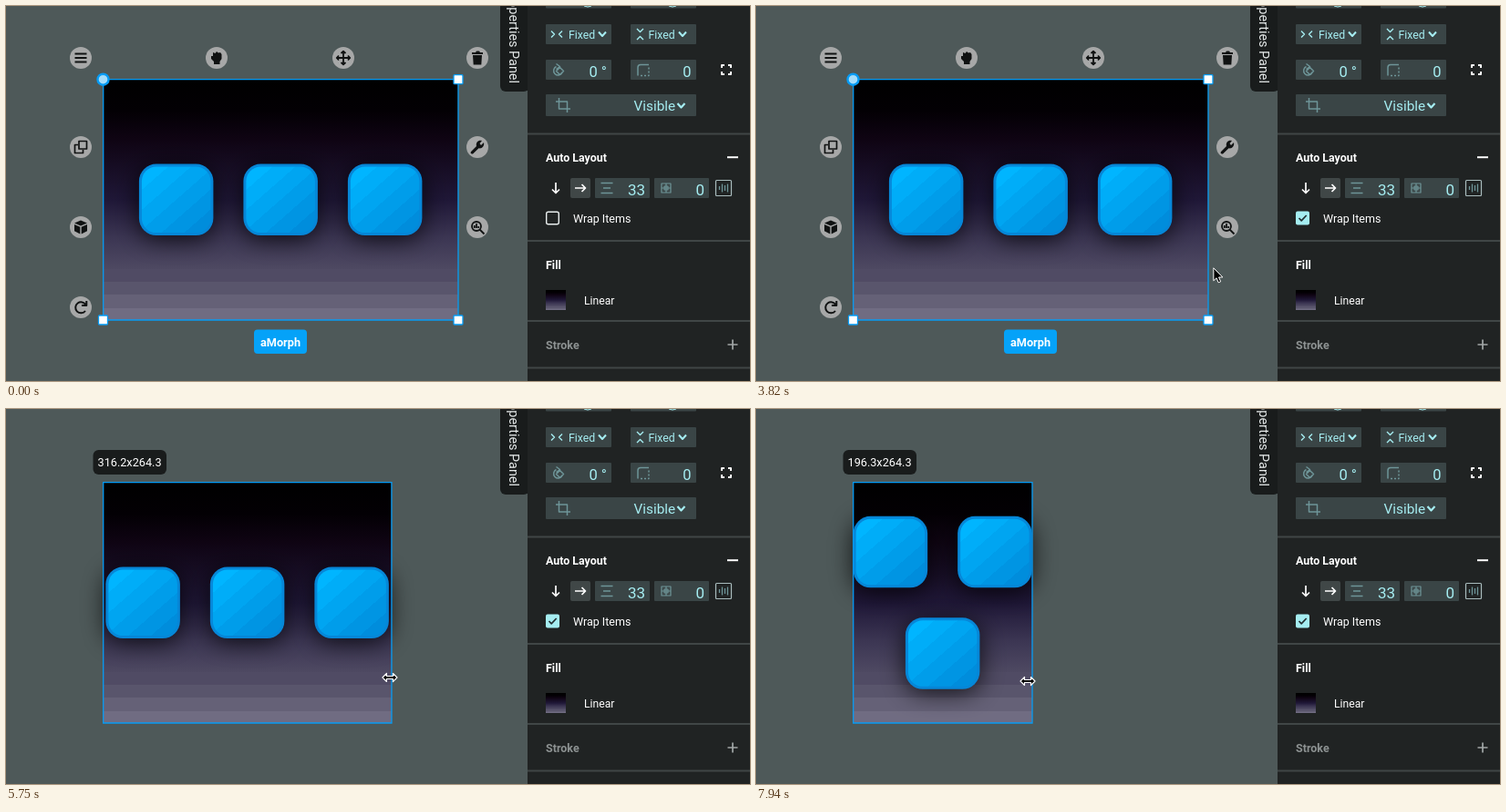
An HTML page with a canvas that plays this animation: 816x412 px, repeating every 8 s.

```html
<!DOCTYPE html>
<html lang="en">
<head>
<meta charset="utf-8">
<title>Wrap items</title>
<style>
html, body { margin: 0; width: 100%; height: 100%; overflow: hidden; background: #4e5959; }
canvas { display: block; }
</style>
</head>
<body>
<canvas id="stage" width="816" height="412"></canvas>
<script>
const ctx = document.getElementById('stage').getContext('2d');
const LOOP = 8000, DRAG_START = 4470, CHECK_AT = 2770;
const BLUE = '#079cf5', CYAN = '#a5edf1', DIM = '#6e9598', FIELD = '#3a4546', WHITE = '#fff';
const FRAME = { x: 106.5, y: 80.7, h: 264.3 };
const ITEM = { w: 81.5, h: 78.5, gap: 33 };

// Keyframes: [time, value, ...]
const WIDTH = [[4470, 389.3], [4700, 385.3], [5750, 316.3], [6500, 272.8], [7070, 230.4], [7940, 196.3]];
const APPROACH = [[660, 630, 384], [900, 612, 325], [1140, 587, 262], [1400, 597, 231]];
const LEAVE = [[3250, 596, 233], [3500, 565, 255], [3750, 510, 283], [3940, 495, 291]];
const RESIZE = [[3940, 495, 291], [4470, 495, 289], [4700, 488, 286], [5750, 421, 295], [6500, 374, 299], [7070, 335, 300], [7940, 298, 299]];

// Smooth interpolation, at rest at both ends
function track(keys, t) {
  const last = keys.length - 1;
  if (t <= keys[0][0]) return keys[0].slice(1);
  if (t >= keys[last][0]) return keys[last].slice(1);
  const i = keys.findIndex(k => k[0] > t) - 1;
  const a = keys[i], b = keys[i + 1], span = b[0] - a[0], u = (t - a[0]) / span;
  const slope = (n, c) => n === 0 || n === last ? 0
    : (keys[n + 1][c] - keys[n - 1][c]) / (keys[n + 1][0] - keys[n - 1][0]);
  return a.slice(1).map((v, j) => {
    const c = j + 1, u2 = u * u, u3 = u2 * u;
    return v * (2 * u3 - 3 * u2 + 1) + b[c] * (3 * u2 - 2 * u3)
      + span * (slope(i, c) * (u3 - 2 * u2 + u) + slope(i + 1, c) * (u3 - u2));
  });
}

function box(x, y, w, h, r, fill, stroke, line = 1) {
  ctx.beginPath();
  ctx.roundRect(x, y, w, h, r);
  if (fill) { ctx.fillStyle = fill; ctx.fill(); }
  if (stroke) { ctx.strokeStyle = stroke; ctx.lineWidth = line; ctx.stroke(); }
}

function text(s, x, y, size, color, weight = 400, align = 'left') {
  ctx.font = `${weight} ${size}px Roboto, "Noto Sans", sans-serif`;
  ctx.fillStyle = color;
  ctx.textAlign = align;
  ctx.fillText(s, x, y);
}

// SVG path drawn around (x, y)
function icon(d, x, y, { stroke, fill, line = 1.5 }) {
  const path = new Path2D(d);
  ctx.save();
  ctx.translate(x, y);
  ctx.lineWidth = line;
  ctx.lineJoin = 'round';
  if (fill) { ctx.fillStyle = fill; ctx.fill(path); }
  if (stroke) { ctx.strokeStyle = stroke; ctx.stroke(path); }
  ctx.restore();
}

const CHEVRON = 'M-4 -2L0 2.5L4 -2';
const ARROW_DOWN = 'M0 -6V5M-4 1.5L0 5.5L4 1.5';
const ARROW_RIGHT = 'M-6 0H5M1.5 -4L5.5 0L1.5 4';

const BACKDROP = [
  [0, 0, 0, 0], [.13, 3, 0, 4], [.25, 15, 4, 19], [.5, 31, 23, 55], [.66, 60, 54, 83], [.79, 78, 73, 98],
  [.79, 80, 75, 100], [.84, 80, 75, 100], [.84, 89, 85, 108], [.895, 89, 85, 108],
  [.895, 101, 97, 119], [.952, 101, 97, 119], [.952, 112, 108, 130], [1, 112, 108, 130]
];

function backdrop(y, h) {
  const g = ctx.createLinearGradient(0, y, 0, y + h);
  for (const [at, r, gr, b] of BACKDROP) g.addColorStop(at, `rgb(${r},${gr},${b})`);
  return g;
}

function item(x, y) {
  const { w, h } = ITEM;
  ctx.save();
  ctx.shadowColor = 'rgba(0,0,0,.78)';
  ctx.shadowBlur = 27;
  ctx.shadowOffsetY = 4;
  box(x, y, w, h, 19, '#0687d8');
  ctx.restore();
  const g = ctx.createLinearGradient(x + 8, y + 2, x + w - 8, y + h - 2), bands = 6;
  for (let i = 0; i < bands; i++) {
    const color = `rgb(0,${181 - i * 8},${255 - i * 7})`;
    g.addColorStop(i / bands, color);
    g.addColorStop((i + 1) / bands, color);
  }
  box(x + 3, y + 3, w - 6, h - 6, 16, g);
}

function frame(width) {
  const { x, y, h } = FRAME, perRow = width >= 3 * ITEM.w + 2 * ITEM.gap ? 3 : 2;
  box(x, y, width, h, 0, backdrop(y, h));
  const rows = Math.ceil(3 / perRow);
  const top = y + (h - rows * ITEM.h - (rows - 1) * ITEM.gap) / 2;
  for (let i = 0; i < 3; i++) {
    const row = Math.floor(i / perRow), count = Math.min(perRow, 3 - row * perRow);
    const left = x + (width - count * ITEM.w - (count - 1) * ITEM.gap) / 2;
    item(left + (i % perRow) * (ITEM.w + ITEM.gap), top + row * (ITEM.h + ITEM.gap));
  }
  box(x + .2, y, width, h, 0, null, BLUE, 1.3);
}

function halo(x, y, d, style) {
  box(x - 12, y - 12, 24, 24, 12, '#a7a8a8');
  icon(d, x, y, style);
}

function halos() {
  const ink = '#101212', solid = { fill: ink }, lines = { stroke: ink, line: 2 };
  halo(82, 57, 'M-6.5 -4.5H6.5M-6.5 0H6.5M-6.5 4.5H6.5', lines);
  halo(231, 57, 'M-4 -6L-1.5 -5L0 -7L2 -5.5L4 -6L5.5 -4V1L3.5 4V7H-3V4L-6 1V-2L-4 -2Z', solid);
  halo(370, 57, 'M-7 0H7M0 -7V7M-2.5 -5L0 -7.3L2.5 -5M-2.5 5L0 7.3L2.5 5M-5 -2.5L-7.3 0L-5 2.5M5 -2.5L7.3 0L5 2.5', { stroke: ink, line: 1.8 });
  halo(517, 57, 'M-6 -6H-2L-1 -7.5H2L3 -6H6V-4H-6ZM-5 -3H5L4.3 7.5H-4.3Z', solid);
  halo(82, 155, 'M-2 -6.5H6.5V2H-2ZM-3 -2.5H-6.5V6.5H2.5V3', { stroke: ink, line: 1.7 });
  halo(517, 155, 'M-7 5L-1 -1C-2 -5 1 -8 5 -7L2.5 -4L4 -2L7 -5C8 -1 5 2 1.5 1.3L-5 7.5C-7 8 -8 6.5 -7 5Z', solid);
  halo(82, 243, 'M0 -7.5L7 -4.5L0 -1.5L-7 -4.5ZM-7 -3L-.7 -.2V7.5L-7 4.3ZM7 -3L.7 -.2V7.5L7 4.3Z', solid);
  halo(517, 243, 'M4 -1A5 5 0 1 1 -6 -1A5 5 0 1 1 4 -1M3 3L7.5 7.5M-3.2 -2V1M-1 -4V1M1.2 -1V1', { stroke: ink, line: 1.8 });
  halo(82, 331, 'M5.5 -2.5A6 6 0 1 0 5 4M6.3 -7V-2H1', lines);

  const right = 496, bottom = FRAME.y + FRAME.h;
  for (const [x, y] of [[right, FRAME.y], [FRAME.x, bottom], [right, bottom]])
    box(x - 5, y - 5, 10, 10, 1, WHITE, BLUE, 1.3);
  box(FRAME.x - 6, FRAME.y - 6, 12, 12, 6, '#a5ddfb', BLUE, 2.4);
  box(272, 355.5, 58, 26.5, 4, '#05a2f8');
  text('aMorph', 301, 374, 12.7, WHITE, 700, 'center');
}

function panel(checked) {
  box(542, -10, 32, 104, 6, '#191c1c');
  ctx.save();
  ctx.translate(551.5, 85);
  ctx.rotate(Math.PI / 2);
  text('Properties Panel', 0, 0, 14.4, '#e4e8e8', 400, 'right');
  ctx.restore();

  box(572, 0, 244, 412, 0, '#202323');
  for (const y of [139.5, 257, 345, 396.5]) box(572, y, 244, 2, 0, '#404646');

  for (const x of [592, 685]) {
    box(x, -10, 72, 12.5, 1, FIELD);
    box(x, 20, 72, 22, 1, FIELD);
    box(x, 59, 72, 22, 1, FIELD);
    icon('M-4 0Q0 2 4 0', x + 46, 0, { stroke: CYAN, line: 1 });
  }
  const cyan = { stroke: CYAN, line: 2 }, dim = { stroke: DIM };
  icon('M-6 -3.5L-2.5 0L-6 3.5M6 -3.5L2.5 0L6 3.5', 604, 31, { stroke: CYAN, line: 1.4 });
  icon('M-3.5 -6L0 -2.5L3.5 -6M-3.5 6L0 2.5L3.5 6', 695.5, 31, { stroke: CYAN, line: 1.4 });
  text('Fixed', 617, 35.5, 12.3, CYAN);
  text('Fixed', 704.5, 35.5, 12.3, CYAN);
  icon(CHEVRON, 654, 30.5, cyan);
  icon(CHEVRON, 742, 30.5, cyan);

  icon('M-2 -4A5 5 0 1 0 4.5 3M-2 -7L2 -4L-2 -1M2 -3L6 1L2 5L-2 1Z', 605.5, 70.5, dim);
  text('0 °', 659, 78, 16.5, CYAN, 400, 'right');
  icon('M-6 6V-3Q-6 -6 -3 -6H6M-3 6H-1M1 6H3M6 -3V-1M6 1V3M5 6H6V5', 699, 70.5, dim);
  text('0', 751.5, 78, 16.5, CYAN, 400, 'right');
  icon('M-5 -2V-5H-2M2 -5H5V-2M5 2V5H2M-2 5H-5V2', 790, 70, { stroke: WHITE, line: 2 });

  box(592, 97, 165, 24, 1, FIELD);
  icon('M-8 -4H4.5V8M-4.5 -8V4H8', 611, 109, dim);
  text('Visible', 688.5, 115, 15.4, CYAN);
  icon(CHEVRON, 740.5, 109, { stroke: CYAN, line: 2.2 });

  text('Auto Layout', 592, 171, 12.4, WHITE, 700);
  box(791, 165.2, 12, 2, 0, WHITE);
  icon(ARROW_DOWN, 603, 200, { stroke: WHITE, line: 1.7 });
  box(619, 189, 22, 22, 2, '#404747');
  icon(ARROW_RIGHT, 630, 200, { stroke: WHITE, line: 1.7 });
  box(646, 189, 60, 22, 1, FIELD);
  icon('M-6.5 -5.5H6.5M-4 0H4M-6.5 5.5H6.5', 659, 200, dim);
  text('33', 701, 208, 17, CYAN, 400, 'right');
  box(711, 189, 60, 22, 1, FIELD);
  icon('M-5 -5H5V5H-5ZM-5 0H5M0 -5V5M-2 -2H2V2H-2Z', 724, 200, { stroke: DIM, line: 1.2 });
  text('0', 766, 208, 17, CYAN, 400, 'right');
  box(778.5, 191.5, 17, 17, 1, null, '#a9bcbd', 1.2);
  icon('M-4.5 -2V2M-1.5 -4.5V4.5M1.5 -3V3M4.5 -4.5V4.5', 787, 200, { stroke: DIM, line: 1.3 });

  if (checked) {
    box(592, 225.5, 15, 15, 2, CYAN);
    icon('M-4 0L-1.3 2.8L4.2 -3', 599.5, 233, { stroke: '#243033', line: 1.7 });
  } else {
    box(592.7, 226.2, 13.6, 13.6, 2, null, '#e8eded', 1.4);
  }
  text('Wrap Items', 622, 238, 12.5, WHITE);

  text('Fill', 592, 289, 12.5, WHITE, 700);
  box(592, 312, 22, 22, 0, backdrop(312, 22));
  text('Linear', 634, 328, 12.2, WHITE);
  text('Stroke', 592, 377, 12.5, '#8d9292', 700);
  icon('M-5.5 0H5.5M0 -5.5V5.5', 797, 372, { stroke: '#a1a6a6', line: 1.7 });
}

const outlined = { fill: WHITE, stroke: '#000', line: 1 };
const pointer = (x, y) =>
  icon('M1 0V14L4.2 11L6.3 16L8.8 15L6.7 10.2H11Z', x, y, { fill: '#000', stroke: WHITE, line: 1 });
function hand(x, y) {
  icon('M3.5 1.8Q5 .2 6.2 2V6Q7.5 5.2 8.5 6.5Q10 5.8 10.8 7.2Q12.5 6.8 12.8 8.5V11.5L11.5 15.5H5.5L1 10Q.7 8 2.6 8.5L4 10V3', x, y, outlined);
  icon('M6.7 10V13M8.7 10V13M10.6 10V13', x, y, { stroke: '#000', line: .8 });
}
const resizer = (x, y) =>
  icon('M-8 0L-3.5 -4.5V-1.5H3.5V-4.5L8 0L3.5 4.5V1.5H-3.5V4.5Z', x, y, { fill: '#000', stroke: WHITE, line: 1.2 });

function cursor(t) {
  if (t < 660) return;
  if (t < 1400) {
    const [x, y] = track(APPROACH, t);
    (t > 1260 ? hand : pointer)(x, y);
  } else if (t < 3250) {
    hand(t < 2050 ? 597 : 595, t < 1640 ? 231 : 233);
  } else if (t < 3940) {
    const [x, y] = track(LEAVE, t);
    (t < 3360 ? hand : t > 3880 ? resizer : pointer)(x, y);
  } else {
    resizer(...track(RESIZE, t));
  }
}

function draw(t) {
  const dragging = t >= DRAG_START, [width] = track(WIDTH, t);
  box(0, 0, 816, 412, 0, '#4e5959');
  frame(width);
  if (dragging) {
    box(95.5, 45, 80.5, 27, 6, '#191c1c');
    text(`${width.toFixed(1)}x${FRAME.h}`, 100.5, 63, 12.7, WHITE);
  } else {
    halos();
  }
  panel(t >= CHECK_AT);
  cursor(t);
}

const start = performance.now();
function tick() {
  draw((performance.now() - start) % LOOP);
  requestAnimationFrame(tick);
}
tick();
</script>
</body>
</html>
```
